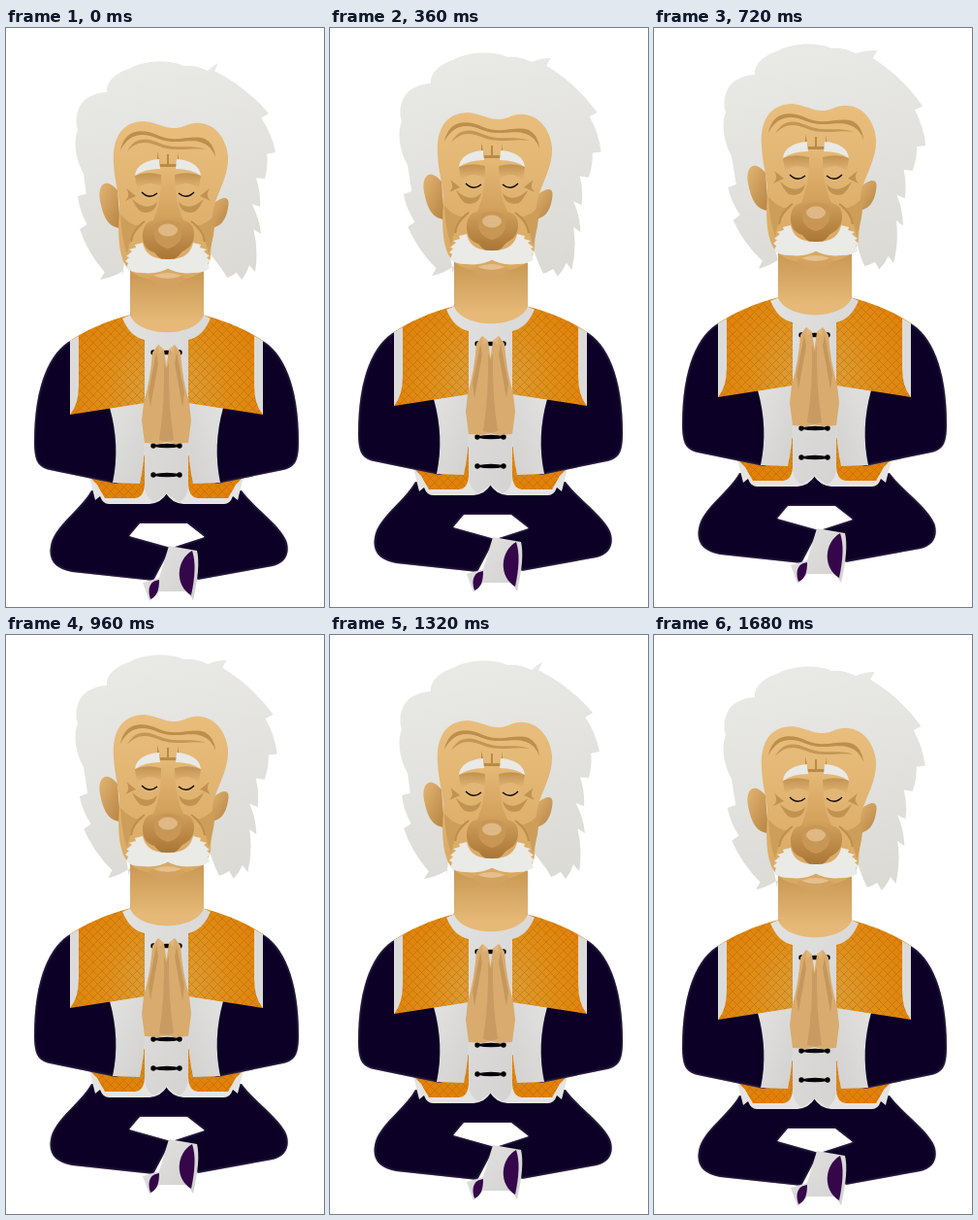
Write an HTML page that moves like this. It is 328x596 px and loops after 1800 ms.

```html
<!DOCTYPE html>
<html lang="en">
<head>
<meta charset="utf-8">
<title>Meditation</title>
<style>
html, body { margin: 0; width: 100%; height: 100%; overflow: hidden; background: #fff; }
svg { display: block; }
.mirror { transform: matrix(-1, 0, 0, 1, 331, 0); }
.mirrorFace { transform: matrix(-1, 0, 0, 1, 334, 0); }
</style>
</head>
<body>
<svg width="328" height="596" viewBox="0 0 328 596">
<defs>
  <linearGradient id="hairFill" x1=".4" y1="0" x2=".6" y2="1">
    <stop stop-color="#e9e9e6"/><stop offset="1" stop-color="#dbdad5"/>
  </linearGradient>
  <linearGradient id="skin" x2="0" y2="1">
    <stop stop-color="#e9be7d"/><stop offset="1" stop-color="#d8a862"/>
  </linearGradient>
  <linearGradient id="neckFill" x2="0" y2="1">
    <stop offset=".2" stop-color="#cb9b56"/><stop offset=".85" stop-color="#e6b978"/>
  </linearGradient>
  <linearGradient id="socket" x2="0" y2="1">
    <stop stop-color="#c19150"/><stop offset="1" stop-color="#e2b574"/>
  </linearGradient>
  <linearGradient id="noseFill" x2="0" y2="1">
    <stop stop-color="#e3b674"/><stop offset=".5" stop-color="#d3a25d"/><stop offset="1" stop-color="#a87435"/>
  </linearGradient>
  <linearGradient id="earFill" x2="1" y2="1">
    <stop stop-color="#e2b472"/><stop offset="1" stop-color="#b78442"/>
  </linearGradient>
  <linearGradient id="cloth" x2="1" y2="1">
    <stop stop-color="#e2e2e1"/><stop offset="1" stop-color="#d2d1d0"/>
  </linearGradient>
  <radialGradient id="orange" gradientUnits="userSpaceOnUse" cx="166" cy="375" r="110">
    <stop stop-color="#dba445"/><stop offset=".6" stop-color="#df8d16"/><stop offset="1" stop-color="#e18108"/>
  </radialGradient>
  <pattern id="mesh" width="9" height="9" patternUnits="userSpaceOnUse">
    <path d="M0 0L9 9M9 0L0 9" stroke="#a85d08" stroke-width=".7" opacity=".55"/>
  </pattern>
  <filter id="soft"><feGaussianBlur stdDeviation="1.8"/></filter>

  <path id="sleeve" d="M68 321C45 333 29 368 29 426C29 446 33 452 45 455L113 469L137 462V321Z"/>
  <path id="legs" d="M88 476C77 496 49 513 46 533C43 549 52 557 68 560L152 569L170 535L127 523L138 510H187L205 524L168 536L198 568L275 554C287 551 293 543 290 530C285 513 256 494 243 476Z"/>
  <path id="panel" d="M129 295C105 301 82 311 66 322V398L143 386V312Z"/>
  <path id="skirt" d="M86 462L94 470L102 484H133Q143 483 143 468V440H100Z"/>
  <clipPath id="sleeveClip"><use href="#sleeve"/></clipPath>
  <clipPath id="legsClip"><use href="#legs"/></clipPath>

  <g id="jacketSide">
    <path d="M86 462L92 486L97 482Q100 490 106 490H148Q160 489 166 479V430H100Z" fill="#e4e4e3"/>
    <use href="#skirt" fill="url(#orange)"/>
    <use href="#skirt" fill="url(#mesh)"/>
    <use href="#sleeve" fill="#5b566c"/>
    <g clip-path="url(#sleeveClip)"><use href="#sleeve" fill="#0c0026" filter="url(#soft)"/></g>
    <path d="M107 391L143 385V426Q143 446 138 469L110 468Q118 430 107 391Z" fill="url(#cloth)"/>
    <use href="#panel" fill="url(#orange)"/>
    <use href="#panel" fill="url(#mesh)"/>
    <path d="M66 322L75 317V367Q75 388 66 398Z" fill="#dbdbda"/>
  </g>
  <g id="hand">
    <path d="M151 334L157 326L163 331L166 352V426L158 428L143 427L140 404L142 386Q149 362 151 334Z" fill="#d9ab6e"/>
    <path d="M155 334L157 345L149 390L147 375Z" fill="#c5975b"/>
    <path d="M163 344L166 352V426L158 424Q164 385 163 344Z" fill="#c89b62"/>
    <path d="M157 326L163 331L158 335Z" fill="#e2b67b"/>
  </g>
  <g id="faceSide">
    <path d="M133 152Q145 147 160 151L161 164Q150 157 135 165Z" fill="url(#socket)"/>
    <path d="M133 152C134 142 143 136 158 135L159 145Q143 145 133 152Z" fill="#e9e9e7"/>
    <ellipse cx="148" cy="168" rx="11" ry="8" fill="#e2b676"/>
    <path d="M130 176Q145 190 156 179Q153 193 139 189Q134 185 130 176Z" fill="#c09351"/>
    <path d="M124 165L134 173L123 178Q129 172 124 165Z" fill="#c09351"/>
    <path d="M118 192Q132 207 142 202Q128 212 125 233Q119 216 118 192Z" fill="#cc9e5a"/>
    <path d="M143 199Q131 207 129 220" fill="none" stroke="#bd8f4d" stroke-width="2"/>
    <path d="M140 169Q148 177 156 170" fill="none" stroke="#120b05" stroke-width="1.4"/>
  </g>
  <path id="moustache" fill="#eaeae7" d="M168 238C152 239 143 232 141 221L133 223L134 226L127 228L130 230L124 235L127 236L123 240L126 242L124 247Q129 252 140 252Q157 254 168 247Z"/>
  <g id="fastener">
    <path d="M152 0Q166 -3 180 0Q166 3 152 0Z" stroke="#08040c" stroke-width="1.5"/>
    <circle cx="152" r="2.7"/><circle cx="179" r="2.7"/>
  </g>
</defs>

<g id="figure">
  <use href="#legs" fill="#5b566c"/>
  <g clip-path="url(#legsClip)"><use href="#legs" fill="#0c0026" filter="url(#soft)"/></g>
  <path d="M168 533L197 538Q201 554 193 589L187 580H158L148 590L141 571L158 566Z" fill="url(#cloth)"/>
  <path d="M158 568C149 569 145 576 149 588C156 585 158 578 158 568Z" fill="#35064a"/>
  <path d="M192 538C175 548 174 574 191 584C195 565 196 550 192 538Z" fill="#35064a"/>

  <use href="#jacketSide"/>
  <use href="#jacketSide" class="mirror"/>
  <path d="M120 299L129 295H203L211 299C205 312 198 319 188 321V468Q188 484 178 488L166 479L153 488Q143 484 143 468V321C133 319 126 312 120 299Z" fill="url(#cloth)"/>
  <use href="#fastener" y="334"/>
  <use href="#fastener" y="430"/>
  <use href="#fastener" y="460"/>
  <use href="#hand"/>
  <use href="#hand" class="mirror"/>

  <path id="hair" fill="url(#hairFill)"/>
  <path d="M128 240V296C138 319 194 319 204 296V240Z" fill="url(#neckFill)"/>
  <path d="M115 167C102 152 94 163 97 178C100 192 104 205 118 206Z" fill="url(#earFill)"/>
  <path d="M214 181C222 174 232 171 229 185C227 198 221 206 209 206Z" fill="url(#earFill)"/>
  <path d="M111 140C109 110 122 96 143 96C160 98 168 107 184 101C207 90 227 108 229 132C230 155 215 173 213 192L211 236Q208 254 182 259Q167 267 150 259Q128 256 121 240Q114 222 117 190C118 175 112 160 111 140Z" fill="url(#skin)"/>
  <path d="M118 126C123 102 143 104 158 111C177 119 190 109 205 114Q215 119 216 133Q212 121 202 118C188 113 176 121 157 114C141 107 127 108 118 126Z" fill="#bc8f4d"/>
  <path d="M125 127C133 111 146 113 157 118C174 126 191 119 206 125C190 122 174 129 156 121C143 116 134 117 125 127Z" fill="#c39755"/>
  <path d="M156 127L159 140H166V130L168 130V140H176L178 128V143H156Z" fill="#b98a48"/>
  <use href="#faceSide"/>
  <use href="#faceSide" class="mirrorFace"/>
  <path d="M160 148H174Q174 180 183 198Q194 200 194 212C194 226 184 228 181 231Q167 249 153 231C145 229 140 222 141 211Q143 199 152 198Q161 178 160 148Z" fill="url(#noseFill)"/>
  <path d="M154 201Q167 194 180 201Q186 222 167 227Q148 222 154 201Z" fill="#c99755"/>
  <ellipse cx="167" cy="208" rx="10" ry="6.5" fill="#dfb884"/>
  <path d="M147 257Q167 248 185 257Q177 267 166 265Q154 267 147 257Z" fill="#d3a260"/>
  <path d="M152 255Q167 249 181 255Q167 261 152 255Z" fill="#e5c08d"/>
  <use href="#moustache"/>
  <use href="#moustache" class="mirrorFace"/>
</g>
</svg>
<script>
const STEP = 120, STEPS = 15, RISE = 6;
const CENTER = [166, 150], NOTCH = 9, BULGE = .1;
const figure = document.getElementById('figure');
const hair = document.getElementById('hair');

// Lock tips, clockwise on each side of the head.
const rightTips = [[219, 36], [271, 88], [278, 128], [267, 155], [262, 184], [263, 212], [257, 251], [243, 259], [228, 257]];
const leftTips = [[118, 258], [97, 259], [76, 207], [74, 173]];

// Locks droop and swing towards the neck as the gust grows.
function swing([x, y], gust) {
  const dx = x - CENTER[0], dy = y - CENTER[1];
  return [x - Math.sign(dx) * dy * gust, y + Math.abs(dx) * gust];
}

// A bulging strand to each tip, then a short cut back towards the head.
function locks(tips, [x, y], gust) {
  return tips.map(tip => {
    const [tx, ty] = swing(tip, gust);
    const strand = `Q${(x + tx) / 2 + (ty - y) * BULGE} ${(y + ty) / 2 - (tx - x) * BULGE} ${tx} ${ty}`;
    const dx = CENTER[0] - tx, dy = CENTER[1] - ty, cut = NOTCH / Math.hypot(dx, dy);
    [x, y] = [tx + dx * cut, ty + dy * cut];
    return `${strand}L${x} ${y}`;
  }).join('');
}

function hairPath(gust) {
  return 'M80 150C72 136 69 118 74 105C70 94 74 78 84 72Q94 66 104 66C103 53 117 45 127 42C141 33 170 32 183 39Q196 38 208 44'
    + locks(rightTips, [208, 44], gust)
    + 'L205 225L122 240'
    + locks(leftTips, [122, 240], gust) + 'Z';
}

function draw() {
  const step = Math.floor(performance.now() / STEP) % STEPS;
  const lift = step <= RISE ? 3 * step : 2 * (STEPS - step);
  figure.setAttribute('transform', `translate(0 ${-lift})`);
  hair.setAttribute('d', hairPath(.1 * Math.abs(Math.sin(Math.PI * step / 11))));
  requestAnimationFrame(draw);
}
draw();
</script>
</body>
</html>
```
